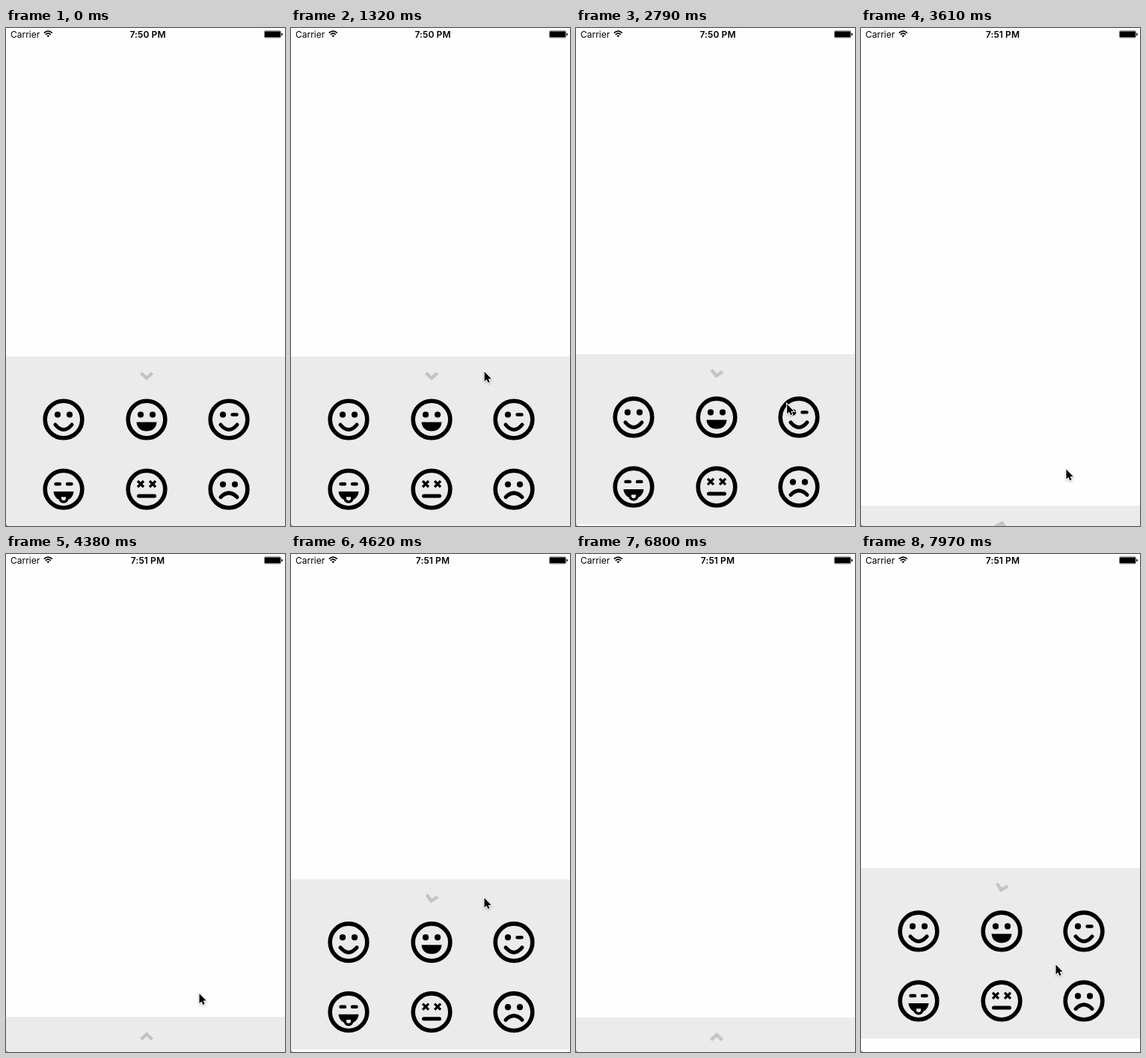
An HTML page for the animation above (8 s loop, 373x664 px).

```html
<!DOCTYPE html>
<html lang="en">
<head>
<meta charset="utf-8">
<title>Emoji drawer</title>
<style>
  html, body { margin: 0; width: 100%; height: 100%; overflow: hidden; background: #fefefe; }
  svg { display: block; width: 100%; height: 100%; }
  text { font: 12px Inter, Roboto, sans-serif; }
  #clock { font-weight: 600; letter-spacing: .1px; text-anchor: middle; }
  .line { fill: none; stroke: #000; stroke-width: 5; stroke-linecap: round; }
  .thin { stroke-width: 4.4; }
  .cross { stroke-width: 3.2; stroke-linecap: butt; }
  #cursor { stroke: #fff; stroke-width: 2; paint-order: stroke; filter: drop-shadow(0 1px 1px #0004); }
</style>
</head>
<body>
<svg viewBox="0 0 373 664">
  <defs>
    <circle id="ring" r="24.8" fill="none" stroke="#000" stroke-width="5.6"/>
    <g id="eyes"><circle cx="-8" cy="-6.5" r="4.1"/><circle cx="8" cy="-6.5" r="4.1"/></g>
    <path id="smile" class="line" d="M-11 7Q0 20 11 7"/>
  </defs>

  <text x="6" y="12.5">Carrier</text>
  <path d="M50.8 6.6Q56.3 1.6 61.8 6.6M52.8 8.8Q56.3 5.6 59.8 8.8" fill="none" stroke="#000" stroke-width="1.7"/>
  <path d="M56.3 12.2L54.3 10.2Q56.3 8.6 58.3 10.2Z"/>
  <text id="clock" x="189.5" y="12.5"></text>
  <rect x="345.4" y="3.9" width="22" height="9" rx="1.4" fill="none" stroke="#555" stroke-width=".8"/>
  <rect x="346" y="4.5" width="20.8" height="7.8" rx=".5"/>
  <path d="M368.3 6.6Q370 7 370 8.4T368.3 10.2Z"/>

  <g id="panel">
    <rect width="373" height="227" fill="#ebebeb"/>
    <path id="chevron" d="M-7.5-4L0 3L7.5-4" fill="none" stroke="#c4c4c4" stroke-width="4.4"/>
    <g transform="translate(77 84)">
      <use href="#ring"/><use href="#eyes"/><use href="#smile"/>
    </g>
    <g transform="translate(188 84)">
      <use href="#ring"/><use href="#eyes"/>
      <path d="M-13.5 3.5H13.5C13 11 8 15.5 0 15.5S-13 11-13.5 3.5Z"/>
    </g>
    <g transform="translate(298 84)">
      <use href="#ring"/><circle cx="-8" cy="-6.5" r="4.1"/>
      <path class="line thin" d="M4.5-6.5H10.5"/><use href="#smile"/>
    </g>
    <g transform="translate(77 177)">
      <use href="#ring"/>
      <path class="line thin" d="M-10.5-7H-5M5-7H10.5"/>
      <path d="M-13.5 3H13.5C13 9 9 13.5 5 14H-5C-9 13.5-13 9-13.5 3Z"/>
      <path d="M-4.8 8.5H4.8V12A4.8 4.8 0 0 1-4.8 12Z" fill="#ebebeb" stroke="#000" stroke-width="3.6"/>
    </g>
    <g transform="translate(188 177)">
      <use href="#ring"/>
      <path class="line cross" d="M-12-11l8 8m0-8l-8 8M4-11l8 8m0-8l-8 8"/>
      <path class="line" d="M-10.5 9H10.5"/>
    </g>
    <g transform="translate(298 177)">
      <use href="#ring"/><use href="#eyes"/>
      <path class="line" d="M-11 10.5Q0-.5 11 10.5"/>
    </g>
  </g>

  <path d="M0 661Q.5 663.5 3 664H0Z" fill="#999"/>
  <path id="cursor" d="M.5 .5V13.5L3.4 10.7L5.4 15.2L7.5 14.3L5.7 9.9H9.7Z"/>
</svg>
<script>
const LOOP = 8000, MINUTE_AT = 2800;
const OPEN_Y = 438, TRAVEL = 180, DECAY = 13.8, FREQ = 19.4, TURN_DELAY = 30;
const NUDGE_AT = 6350, NUDGE_SIZE = 45;

// Swipe times: the drawer closes and opens in turn.
const swipes = [1400, 2540, 3441, 4377, 5298, 7803];

// Pointer moves: start, duration, end x, end y.
const hidden = [380, 549];
const moves = [
  [510, 780, 258, 457],
  [1320, 500, 292, 647],
  [2150, 100, 288, 644],
  [2460, 600, 280, 465],
  [3340, 270, 274, 588],
  [3610, 530, 258, 621],
  [4350, 270, 258, 458],
  [5210, 240, 258, 641],
  [6290, 130, 258, 675],
  [7070, 230, 257, 641],
  [7660, 310, 260, 547]
];

const [clock, panel, chevron, cursor] =
  ['clock', 'panel', 'chevron', 'cursor'].map(id => document.getElementById(id));

const clamp = p => Math.max(0, Math.min(1, p));
const easeOut = p => 1 - (1 - p) ** 2;
const swing = (ms, wave) => Math.exp(-DECAY * ms / 1000) * wave(FREQ * ms / 1000);

// Damped spring from 0 to 1 that overshoots.
function spring(ms) {
  return ms <= 0 ? 0 : 1 - swing(ms, Math.cos) - DECAY / FREQ * swing(ms, Math.sin);
}

function drawerAt(t) {
  let y = OPEN_Y, angle = 0;
  swipes.forEach((start, i) => {
    if (t < start) return;
    const direction = i % 2 ? -1 : 1;
    const from = i % 2 ? OPEN_Y + TRAVEL : OPEN_Y;
    y = from + direction * TRAVEL * spring(t - start);
    angle = 180 * (i + spring(t - start - TURN_DELAY));
  });
  if (t > NUDGE_AT && t < swipes.at(-1)) y += NUDGE_SIZE * swing(t - NUDGE_AT, Math.sin);
  return { y, angle };
}

function pointerAt(t) {
  return moves.reduce(([x, y], [start, duration, endX, endY]) => {
    const p = easeOut(clamp((t - start) / duration));
    return [x + (endX - x) * p, y + (endY - y) * p];
  }, hidden);
}

function draw(t) {
  const { y, angle } = drawerAt(t);
  panel.setAttribute('transform', `translate(0 ${y})`);
  chevron.setAttribute('transform', `translate(188 26) rotate(${angle})`);
  cursor.setAttribute('transform', `translate(${pointerAt(t)})`);
  clock.textContent = t < MINUTE_AT ? '7:50 PM' : '7:51 PM';
}

const startTime = performance.now();
function tick() {
  draw((performance.now() - startTime) % LOOP);
  requestAnimationFrame(tick);
}
tick();
</script>
</body>
</html>
```
